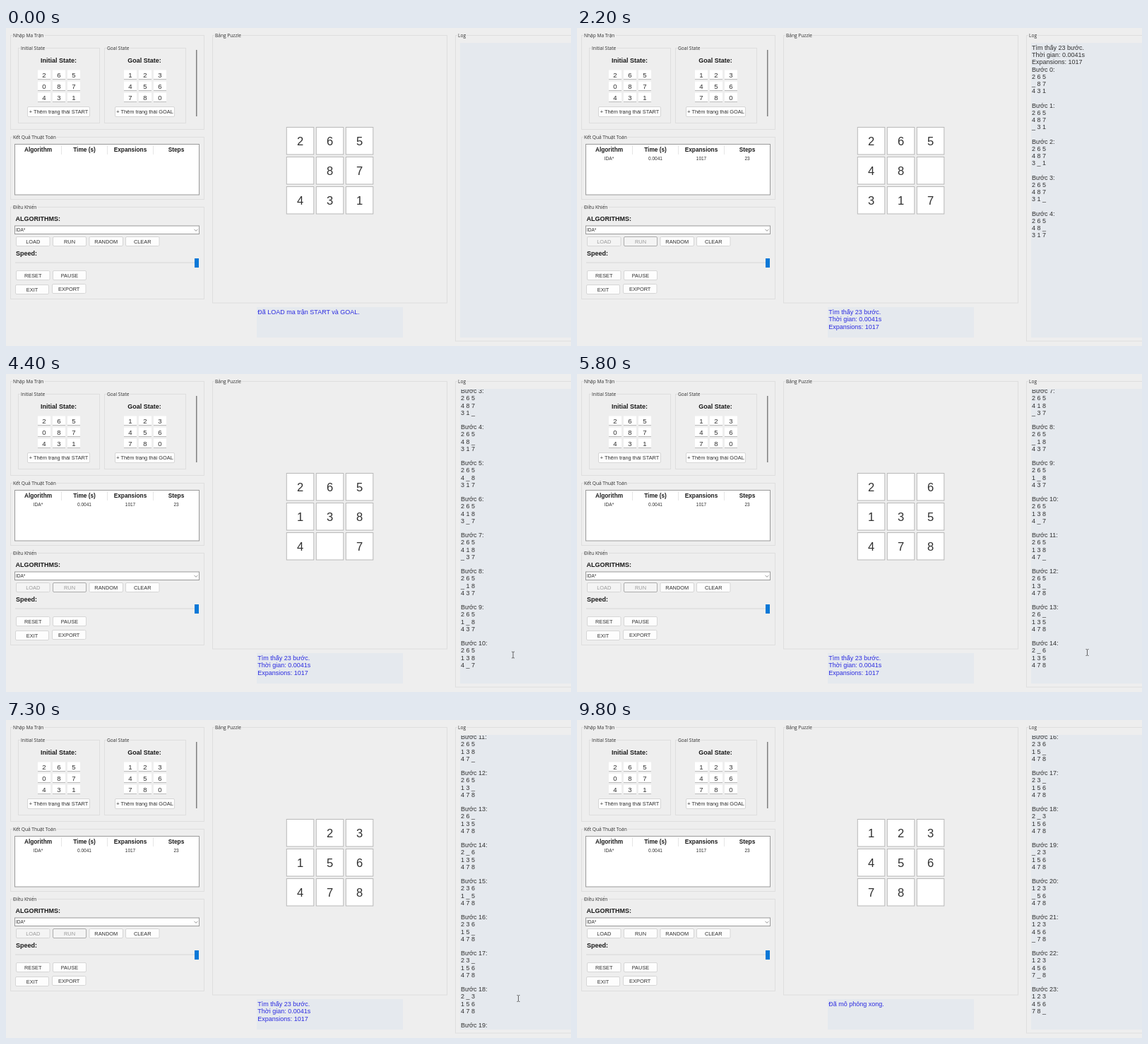
An HTML page for the animation above (9.9 s loop, 800 px wide and 450 px high).

```html
<!DOCTYPE html>
<html lang="vi">
<head>
<meta charset="utf-8">
<style>
html, body { margin: 0; width: 100%; height: 100%; overflow: hidden; background: #eee; }
svg { display: block; }
text { font-family: "Liberation Sans", Arial, sans-serif; fill: #303030; white-space: pre; }
.title { font-family: "Open Sans", sans-serif; }
.bold { font-weight: bold; fill: #1a1a1a; }
.message { fill: #2c2ce0; }
</style>
</head>
<body>
<svg id="stage" width="800" height="450" viewBox="0 0 800 450"></svg>
<script>
const LOOP = 9900, TICK = 100;
const RUN_AT = 500, FIRST_STEP = 535, STEP = 355, DONE_AT = 9000;
const LINE = 10.2, BLOCK = 5 * LINE;
const PANEL = '#e5e9ee';
const stage = document.getElementById('stage');

function add(tag, attrs, parent = stage) {
  const el = document.createElementNS('http://www.w3.org/2000/svg', tag);
  for (const key in attrs) el.setAttribute(key, attrs[key]);
  return parent.appendChild(el);
}
const rect = (x, y, width, height, fill, stroke = 'none', rx = 0) =>
  add('rect', { x, y, width, height, fill, stroke, rx });

// Text with its capitals centred on cy
function label(x, cy, string, size, anchor = 'start', cls = '', parent = stage) {
  const el = add('text', { x, y: cy + size * 0.36, 'font-size': size, 'text-anchor': anchor, class: cls }, parent);
  el.textContent = string;
  return el;
}
function group(x, y, right, bottom, title) {
  rect(x + .5, y + .5, right - x, bottom - y, 'none', '#dedede');
  const text = label(x + 4, y + .3, title, 6.6, 'start', 'title');
  const gap = rect(x + 3, y - 2, text.getComputedTextLength() + 2, 5, '#eee');
  stage.insertBefore(gap, text);
}
function button(x, y, width, height, string) {
  const box = rect(x + .5, y + .5, width - 1, height - 1, '#fdfdfd', '#d6d6d6', 1.5);
  const text = label(x + width / 2, y + height / 2 + .2, string, 7.4, 'middle');
  return { box, text };
}
function entries(left, digits) {
  [...digits].forEach((digit, i) => {
    const x = left + i % 3 * 21, y = 59.5 + Math.floor(i / 3) * 16;
    rect(x, y, 18, 13, '#fff');
    rect(x, y + 12.5, 18, 1, '#bcbcbc');
    label(x + 9, y + 6.6, digit, 9.6, 'middle');
  });
}

// Every board on the way, from the moves of the blank
const boards = ['265087431'];
for (const move of 'DRRULDLURDRUULDRULLDDRR') {
  const cells = [...boards.at(-1)];
  const from = cells.indexOf('0'), to = from + { U: -3, D: 3, L: -1, R: 1 }[move];
  [cells[from], cells[to]] = [cells[to], cells[from]];
  boards.push(cells.join(''));
}
const goal = boards.at(-1), last = boards.length - 1;

// Matrix input
group(6, 10, 280, 143, 'Nhập Ma Trận');
group(17, 28, 132, 134, 'Initial State');
group(139, 28, 254, 134, 'Goal State');
label(74.5, 45.5, 'Initial State:', 9, 'middle', 'bold');
label(196, 45.5, 'Goal State:', 9, 'middle', 'bold');
entries(45, boards[0]);
entries(167, goal);
button(30, 111, 89, 15, '+ Thêm trạng thái START');
button(154, 111, 85, 15, '+ Thêm trạng thái GOAL');
rect(269, 31, 1.5, 94, '#808080');

// Results table
group(6, 154, 280, 242, 'Kết Quả Thuật Toán');
rect(12.5, 164.5, 261, 71.5, '#fff', '#9a9a9a');
const columns = [45.5, 111, 176, 241];
['Algorithm', 'Time (s)', 'Expansions', 'Steps'].forEach((name, i) => {
  label(columns[i], 172, name, 8.3, 'middle', 'bold');
  if (i) rect(columns[i] - 33, 166, 1, 13, '#e6e6e6');
});
const result = add('g', {});
['IDA*', '0.0041', '1017', '23'].forEach((value, i) =>
  label(columns[i], 184.3, value, 6.5, 'middle', '', result));

// Controls
group(6, 253, 280, 383, 'Điều Khiển');
label(13.5, 270, 'ALGORITHMS:', 9, 'start', 'bold');
rect(12.5, 280, 261, 11.5, '#fff', '#9a9a9a');
label(14, 286, 'IDA*', 6.5);
add('path', { d: 'M266.5 284.8l2.5 2.5 2.5-2.5', fill: 'none', stroke: '#777', 'stroke-width': .8 });
const load = button(14, 295, 48.5, 14, 'LOAD');
const run = button(66, 295, 48, 14, 'RUN');
button(117.5, 295, 48.5, 14, 'RANDOM');
button(169, 295, 48.5, 14, 'CLEAR');
label(14, 318.6, 'Speed:', 9, 'start', 'bold');
rect(13, 331, 260, 2, '#e2e2e2');
rect(267, 326, 6, 13, '#0a78d7');
button(14, 343, 48.5, 14, 'RESET');
button(66, 343, 48, 14, 'PAUSE');
button(13, 363, 48, 14, 'EXIT');
button(65, 362, 48.5, 14, 'EXPORT');

// Puzzle board
group(292, 10, 624, 388.5, 'Bảng Puzzle');
const tiles = [...boards[0]].map((_, i) => {
  const x = 397.3 + i % 3 * 42, y = 140.5 + Math.floor(i / 3) * 42;
  rect(x, y, 38.5, 38.5, '#fff', '#b8b8b8');
  return label(x + 19.2, y + 19.7, '', 16.6, 'middle');
});

// Status message
rect(355, 395, 207, 43, PANEL);
const summary = ['Tìm thấy 23 bước.', 'Thời gian: 0.0041s', 'Expansions: 1017'];
const message = summary.map((_, i) => label(356.3, 402 + i * LINE, '', 9, 'start', 'message'));

// Log
group(636, 10, 820, 442.5, 'Log');
rect(643, 21, 157, 417, PANEL);
const logView = add('svg', { x: 643, y: 22, width: 157, height: 415 });
const logText = add('g', {}, logView);
const logLine = (i, string, parent) => label(1, 5.8 + i * LINE, string, 9, 'start', '', parent);
const head = add('g', {}, logText);
summary.forEach((line, i) => logLine(i, line, head));
const blocks = boards.map((board, n) => {
  const block = add('g', {}, logText);
  logLine(3 + n * 5, `Bước ${n}:`, block);
  board.replace('0', '_').match(/.../g).forEach((row, r) =>
    logLine(4 + n * 5 + r, [...row].join(' '), block));
  return block;
});
const settled = n => Math.max(0, n * BLOCK - 322.5);

// Text pointer: time, x, y
const path = [[2900, 732, 440], [3300, 729, 415], [3800, 713.5, 391.5], [4400, 718, 397.5],
  [5000, 720, 396], [5800, 722.5, 394], [7300, 725.5, 394], [8900, 727, 396], [9300, 725, 424]];
const pointer = add('path', {
  d: 'M-2-4.5Q0-4.5 0-3.5Q0-4.5 2-4.5M0-3.5V3.5M-2 4.5Q0 4.5 0 3.5Q0 4.5 2 4.5',
  fill: 'none', stroke: '#555', 'stroke-width': .9
});

const clamp = v => Math.min(1, Math.max(0, v));
const show = (el, on) => el.setAttribute('visibility', on ? 'visible' : 'hidden');

function movePointer(t) {
  const i = path.findIndex(([time]) => time > t);
  show(pointer, i > 0);
  if (i < 1) return;
  const [t0, x0, y0] = path[i - 1], [t1, x1, y1] = path[i], k = (t - t0) / (t1 - t0);
  pointer.setAttribute('transform', `translate(${x0 + (x1 - x0) * k} ${y0 + (y1 - y0) * k})`);
}

function draw(t) {
  const started = t >= RUN_AT, done = t >= DONE_AT, busy = started && !done;
  const step = Math.min(last, Math.floor((t - FIRST_STEP) / STEP));
  const shown = Math.max(0, step);

  tiles.forEach((tile, i) => tile.textContent = boards[shown][i].replace('0', ''));
  const lines = done ? ['Đã mô phỏng xong.'] : started ? summary : ['Đã LOAD ma trận START và GOAL.'];
  message.forEach((el, i) => el.textContent = lines[i] || '');
  show(result, started);
  show(head, started);
  blocks.forEach((block, n) => show(block, n <= step));

  const k = clamp((t - FIRST_STEP - shown * STEP - 20) / 110);
  const offset = settled(shown - 1) * (1 - k) + settled(shown) * k;
  logText.setAttribute('transform', `translate(0 ${-offset})`);

  for (const { box, text } of [load, run]) {
    text.style.fill = busy ? '#9a9a9a' : '';
    box.setAttribute('fill', busy ? '#f4f4f4' : '#fdfdfd');
  }
  run.box.setAttribute('stroke', busy ? '#adadad' : '#d6d6d6');
  movePointer(t);
}

function frame() {
  draw(Math.floor(performance.now() % LOOP / TICK) * TICK);
  requestAnimationFrame(frame);
}
frame();
</script>
</body>
</html>
```
